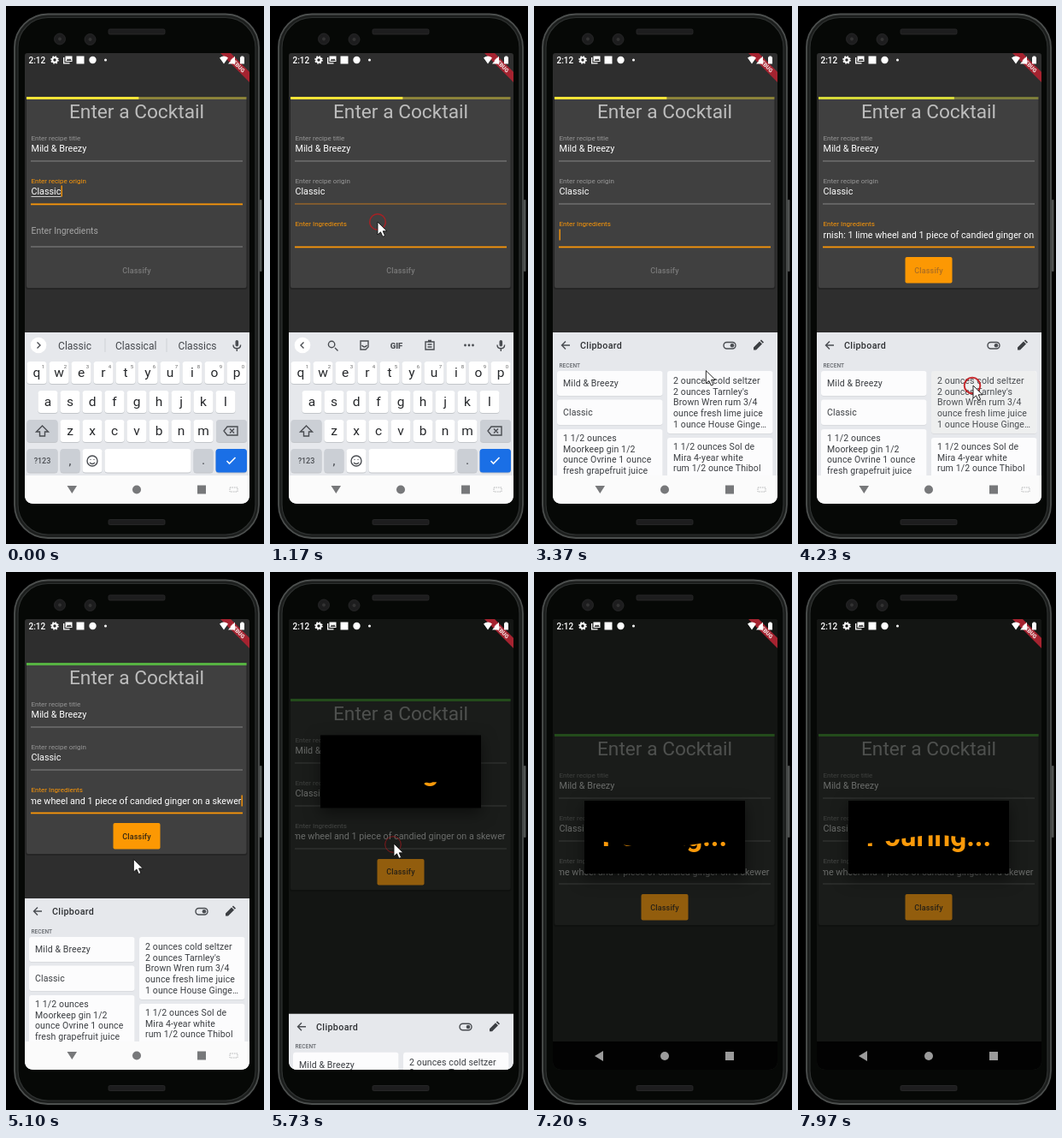
An HTML page that plays this animation: 302 by 628 pixels, repeating every 8000 ms.

```html
<!DOCTYPE html>
<html lang="en">
<head>
<meta charset="utf-8">
<title>Cocktail form</title>
<style>
html, body { margin: 0; width: 100%; height: 100%; overflow: hidden; background: #000; }
svg { display: block; width: 100%; height: 100%; }
text { font-family: Roboto, sans-serif; white-space: pre; }
.mid { text-anchor: middle; }
.line { fill: none; stroke: #4a4d52; stroke-width: 1.4; }
#dialog { filter: drop-shadow(0 6px 9px rgba(0, 0, 0, .5)); }
</style>
</head>
<body>
<svg id="stage" viewBox="0 0 302 628">
  <defs>
    <clipPath id="screen"><path d="M22 58q0-3 3-3H282q3 0 3 3V570q0 11-11 11H33q-11 0-11-11Z"/></clipPath>
    <clipPath id="fieldClip"><rect x="29" y="255" width="248.500" height="24"/></clipPath>
    <clipPath id="panelClip"><rect x="22" y="381" width="263" height="167"/></clipPath>
    <clipPath id="liquid"><path id="wave"/></clipPath>
  </defs>

  <!-- phone body -->
  <rect x="297" y="226" width="2.500" height="84" rx="1" fill="#505352"/>
  <rect x="10" y="9.500" width="286" height="611.500" rx="39" fill="#1c1e1d" stroke="#4c4f4e" stroke-width="1.800"/>
  <rect x="14" y="13.500" width="278" height="603.500" rx="35" fill="#060806" stroke="#2e3130" stroke-width="1.200"/>
  <g fill="#1d1d1e" stroke="#2b2b2c" stroke-width=".8">
    <rect x="120" y="27" width="66" height="6" rx="1.500"/>
    <rect x="120" y="599.500" width="66" height="6" rx="1.500"/>
    <circle cx="63" cy="38.500" r="6.500"/><circle cx="98.500" cy="39" r="6.500"/>
  </g>
  <g fill="#333"><circle cx="63" cy="38.500" r="2"/><circle cx="98.500" cy="39" r="2"/></g>

  <g clip-path="url(#screen)">
    <rect x="22" y="55" width="263" height="526" fill="#2e2e2e"/>
    <g id="form">
      <rect x="23" y="107" width="259.500" height="224" rx="3" fill="#252525"/>
      <rect x="24" y="107" width="257.500" height="222" rx="2" fill="#404040"/>
      <rect id="track" x="24" y="106" width="257.500" height="3"/>
      <rect id="bar" x="24" y="106" height="3"/>
      <text class="mid" x="153" y="131" font-size="22.700" fill="#bdbdbd">Enter a Cocktail</text>
      <g id="fields"></g>
    </g>
    <rect id="barrier" x="22" y="55" width="263" height="526" fill="#010401"/>
    <g id="button">
      <rect id="buttonFill" x="125.500" y="293" width="55" height="30.500" rx="2" fill="#fc9803"/>
      <text id="buttonText" class="mid" x="153" y="311.500" font-size="9" font-weight="500" letter-spacing=".15">Classify</text>
    </g>
    <g id="dialog">
      <rect x="59" y="267" width="188" height="85" fill="#000"/>
      <text class="mid" x="153" y="319.500" font-size="33.300" font-weight="700" fill="#fb9a0a" clip-path="url(#liquid)">Pouring...</text>
    </g>

    <!-- system navigation -->
    <rect x="22" y="548" width="263" height="33" fill="#020202"/>
    <g fill="#9b9b9b"><path d="M71 565l10-6v12z"/><circle cx="153" cy="565" r="5"/><rect x="224" y="560" width="10" height="10"/></g>

    <g id="keyboard">
      <rect x="22" y="381" width="263" height="200" fill="#e6e8ec"/>
      <g id="keys"></g>
      <g id="suggestions" font-size="12" fill="#44474c"></g>
      <g id="tools">
        <path class="line" d="M76 399l3.500 3.500M75.800 395a3.700 3.700 0 1 1-7.400 0a3.700 3.700 0 1 1 7.400 0M106 391h9v7l-3 3h-6zM107.500 396q3 4 6 0M182 392h10v9h-10zM185 390.500h4M184.500 395h5M184.500 398h5"/>
        <text class="mid" x="148" y="399.500" font-size="9.500" font-weight="900" fill="#4a4d52">GIF</text>
        <g fill="#4a4d52"><circle cx="228.500" cy="396" r="1.400"/><circle cx="233" cy="396" r="1.400"/><circle cx="237.500" cy="396" r="1.400"/></g>
      </g>
      <g id="strip">
        <circle cx="38" cy="396" r="9.300" fill="#fff"/>
        <path id="chevron" class="line"/>
        <rect x="268.500" y="390" width="3.600" height="7.500" rx="1.800" fill="#4a4d52"/>
        <path class="line" stroke-width="1.100" d="M266 395.500q0 4.300 4.300 4.300t4.300-4.300M270.300 400v3"/>
      </g>
      <g id="clipboard" clip-path="url(#panelClip)">
        <rect x="22" y="381" width="263" height="167" fill="#e6e8ec"/>
        <path class="line" d="M42 396H33M37 391.500l-4.500 4.500 4.500 4.500"/>
        <text x="54" y="400" font-size="10.700" font-weight="500" letter-spacing=".35" fill="#2e3033">Clipboard</text>
        <rect class="line" x="222" y="392.500" width="14" height="7.500" rx="3.700"/><circle cx="232" cy="396.200" r="2.300" fill="#4a4d52"/>
        <path d="M257 401.500v-3l7-7 3 3-7 7zM264.800 390.700l1.200-1.200 3 3-1.200 1.200z" fill="#3c3f43"/>
        <text x="29.500" y="421.500" font-size="6.600" font-weight="500" fill="#66696e">RECENT</text>
        <g id="cards" font-size="10.500" letter-spacing=".13"></g>
        <rect id="ripple" x="156" y="426" width="123" height="73" rx="3" fill="#9aa0a6"/>
      </g>
      <rect x="22" y="548" width="263" height="33" fill="#fbfbfb"/>
      <g fill="#77787a"><path d="M71.500 560h11.500l-5.700 9z"/><circle cx="153" cy="564.500" r="5"/><rect x="224" y="559.500" width="10" height="10"/></g>
      <path d="M262 562h9v5h-9z" fill="none" stroke="#b5b6b8" stroke-dasharray="1.500 1"/>
    </g>

    <!-- status bar -->
    <path d="M251 55h12l22 22v12z" fill="#a52330"/>
    <text class="mid" transform="translate(269.500 70.700) rotate(45)" font-size="6.500" font-weight="900" fill="#f3dede">DEBUG</text>
    <g fill="#fff">
      <text x="26.500" y="67" font-size="10" font-weight="500">2:12</text>
      <circle cx="57" cy="63" r="2.700" fill="none" stroke="#fff" stroke-width="2"/>
      <circle cx="57" cy="63" r="4" fill="none" stroke="#fff" stroke-width="1.600" stroke-dasharray="1.600 1.542"/>
      <path d="M67 60v7.500h7.500v-1.300H68.300V60zM69.500 58.500h8v6.500h-8z"/>
      <path d="M70.500 64l2-2.500 1.300 1.300 1.200-1.500 1.800 2.700z" fill="#333"/>
      <rect x="82.500" y="58.500" width="9" height="9"/><circle cx="101.500" cy="63" r="4.200"/><circle cx="116.500" cy="63" r="1.500"/>
      <path d="M250 60.500q5-4 10 0l-5 7zM268 58.500v9h-8zM274 59.500h1.200v-1h2.600v1H279v8h-5z"/>
    </g>
  </g>

  <circle id="dot" cx="126" cy="252.500" r="1.700" fill="#8d1c1c"/>
  <circle id="ring" fill="none" stroke="#c4181d"/>
  <path id="mouse" d="M0 0V15L3.500 11.800 6 17.300 8.600 16.200 6.200 10.800H11Z" fill="#fff" stroke="#111" stroke-width=".9"/>
</svg>
<script>
const LOOP = 8000, ORANGE = [250, 150, 8], GREY = [150, 150, 150];
const $ = id => document.getElementById(id);
const set = (node, attrs) => { for (const k in attrs) node.setAttribute(k, attrs[k]); return node; };
function add(parent, tag, attrs, text) {
  const node = set(document.createElementNS("http://www.w3.org/2000/svg", tag), attrs);
  if (text) node.textContent = text;
  return parent.appendChild(node);
}
const progress = (t, from, to) => Math.min(1, Math.max(0, (t - from) / (to - from)));
const smooth = p => p * p * (3 - 2 * p);
const ease = (t, from, to) => smooth(progress(t, from, to));
const mix = (a, b, p) => a + (b - a) * p;
const blend = (a, b, p) => `rgb(${a.map((v, i) => Math.round(mix(v, b[i], p)))})`;
const show = (id, opacity) => set($(id), { opacity: +opacity });

// Form fields
const fields = $("fields");
function addField(y, label, value) {
  return {
    label: add(fields, "text", { x: 29.5, y: y - 24, "font-size": 8, fill: blend(GREY, GREY, 0) }, label),
    value: add(fields, "text", { x: 29.5, y: y - 11, "font-size": 10.75, fill: "#fff" }, value),
    line: add(fields, "rect", { x: 29, y: y - .5, width: 248, height: 1, fill: "#858585" }),
  };
}
const DRINK = "Mild & Breezy";
const title = addField(181, "Enter recipe title", DRINK);
const origin = addField(231, "Enter recipe origin", "Classic");
const ingredients = addField(281, "Enter Ingredients", "");
const RECIPE = "2 ounces cold seltzer 2 ounces Tarnley's Brown Wren rum 3/4 ounce fresh lime juice " +
  "1 ounce House Ginger syrup. Garnish: 1 lime wheel and 1 piece of candied ginger on a skewer";
const clipped = add(fields, "g", { "clip-path": "url(#fieldClip)" });
clipped.append(ingredients.value);
ingredients.value.textContent = RECIPE;
set(ingredients.value, { "text-anchor": "end", y: 270.5 });
set(ingredients.label, { x: 0, y: 0 });
const composing = add(fields, "rect", { x: 29.5, y: 222, width: 35, height: .9, fill: "#ddd" });
const caret = add(fields, "rect", { width: 1.4, height: 13, fill: blend(ORANGE, ORANGE, 0) });

// Keyboard
const keys = $("keys");
function addKey(x, y, width, fill = "#fff", height = 26) {
  add(keys, "rect", { x, y: y + 1, width, height, rx: 3.5, fill: "#c3c6ca" });
  add(keys, "rect", { x, y, width, height, rx: 3.5, fill });
}
function addRow(letters, x, y, hints = "") {
  [...letters].forEach((letter, i) => {
    const cx = x + i * 26;
    addKey(cx - 11.5, y - 13, 23);
    add(keys, "text", { class: "mid", x: cx, y: y + 5, "font-size": 15.5, fill: "#26282b" }, letter);
    if (hints) add(keys, "text", { class: "mid", x: cx + 7.5, y: y - 5, "font-size": 6, fill: "#666" }, hints[i]);
  });
}
addRow("qwertyuiop", 36, 428, "1234567890");
addRow("asdfghjkl", 49, 462);
addRow("zxcvbnm", 75, 496);
const DARK_KEY = "#cbcfd5";
for (const [x, y, width, fill] of [
  [24.5, 483, 36, DARK_KEY], [246, 483, 36, DARK_KEY], [24.5, 517, 36, DARK_KEY], [63.5, 517, 23, DARK_KEY],
  [89.5, 517, 23], [115.5, 517, 101], [219.5, 517, 23, DARK_KEY], [245.5, 517, 36.5, "#1a6fe6"],
]) addKey(x, y, width, fill, y > 500 ? 27.5 : 26);
for (const [x, y, size, text] of [[42.5, 534, 9, "?123"], [75, 535, 13, ","], [231, 535, 13, "."]])
  add(keys, "text", { class: "mid", x, y, "font-size": size, "font-weight": 500, fill: "#4a4d52" }, text);
add(keys, "path", { class: "line", d: "M42.500 490l-7 7h4v5h6v-5h4zM259 491h12v10h-12l-4-5zM262 493.500l5 5m0-5l-5 5M107 531a6 6 0 1 1-12 0a6 6 0 1 1 12 0M98 533q3 3 6 0M99 529v.8M103 529v.8" });
add(keys, "path", { d: "M258.500 531l3 3 7-7", fill: "none", stroke: "#fff", "stroke-width": 1.6 });

["Classic", "Classical", "Classics"].forEach((word, i) =>
  add($("suggestions"), "text", { class: "mid", x: 80.5 + i * 71.7, y: 401 }, word));
add($("suggestions"), "path", { d: "M116 388v16M188 388v16", stroke: "#cfd2d6" });

// Clipboard cards
function addCard(x, y, height, baseline, lines) {
  add($("cards"), "rect", { x, y: y + .8, width: 123.5, height, rx: 3, fill: "#d5d7db" });
  add($("cards"), "rect", { x, y, width: 123.5, height, rx: 3, fill: "#fcfcfd" });
  lines.forEach((line, i) =>
    add($("cards"), "text", { x: x + 7, y: baseline + i * 12.7, fill: "#3a3d41" }, line));
}
addCard(27, 426, 29, 444, [DRINK]);
addCard(27, 459.5, 29.5, 478, ["Classic"]);
addCard(27, 494, 60, 508, ["1 1/2 ounces", "Moorkeep gin 1/2", "ounce Ovrine 1 ounce", "fresh grapefruit juice"]);
addCard(156, 426, 73, 441, ["2 ounces cold seltzer", "2 ounces Tarnley's", "Brown Wren rum 3/4", "ounce fresh lime juice", "1 ounce House Ginge…"]);
addCard(156, 504, 50, 518, ["1 1/2 ounces Sol de", "Mira 4-year white", "rum 1/2 ounce Thibol"]);

// Pointer: time, x, y
const PATH = [
  [200, -14, 330], [740, 126, 252], [1570, 126, 252], [2260, 195, 396], [2900, 195, 396], [3700, 205, 443],
  [4480, 205, 443], [5060, 150, 338], [5240, 145, 317], [5830, 145, 317], [6250, -14, 330],
];
const CLICKS = [[860, 126, 252], [2400, 194, 396], [4030, 204, 443], [5330, 144, 318]];
const PASTE = 4080, LOAD = 5400;

function movePointer(t) {
  let i = PATH.findIndex(p => p[0] > t);
  if (i < 0) i = PATH.length - 1;
  const to = PATH[i], from = PATH[Math.max(0, i - 1)];
  const p = ease(t, from[0], to[0] + .001);
  set($("mouse"), { transform: `translate(${mix(from[1], to[1], p)} ${mix(from[2], to[2], p)})` });
  const click = CLICKS.find(([start]) => t >= start && t < start + 600);
  show("ring", click ? 1 - ((t - click[0]) / 650) ** 2 : 0);
  if (click) set($("ring"), { cx: click[1], cy: click[2], r: 9.3, "stroke-width": mix(3, 1, progress(t, click[0], click[0] + 400)) });
  show("dot", t > 1460 && t < 2600);
}

function drawForm(t) {
  const pasted = t >= PASTE;
  const filled = progress(t, PASTE, 4900) ** .9;
  const color = blend([250, 228, 55], [86, 178, 66], filled);
  set($("track"), { fill: color, "fill-opacity": .42 });
  set($("bar"), { fill: color, width: 257.5 * mix(.51, 1, filled) });

  const focus = ease(t, 930, 1130), blur = ease(t, LOAD, 5560);
  set(origin.label, { fill: blend(ORANGE, GREY, focus) });
  const residue = blend([190, 118, 30], [133, 133, 133], ease(t, 2470, 2800));
  set(origin.line, { fill: focus < 1 ? blend(ORANGE, [190, 118, 30], focus) : residue, height: mix(1.8, 1, focus) });
  const active = focus * (1 - blur);
  set(ingredients.label, {
    "font-size": mix(10.4, 8, focus), fill: blend([165, 165, 165], ORANGE, active),
    transform: `translate(29.5 ${mix(265.5, 257, focus)})`,
  });
  set(ingredients.line, { fill: blend([133, 133, 133], ORANGE, active), height: mix(1, 1.8, active) });

  const scroll = 900 * (1 - progress(t, PASTE, PASTE + 240)) ** 3;
  set(ingredients.value, { x: 275.5 + scroll, opacity: +pasted });
  const composed = t < 930;
  set(composing, { opacity: +composed });
  const blink = composed || Math.floor((t - (pasted ? PASTE : 1200)) / 500) % 2 === 0;
  const caretInView = !pasted || scroll < 2 && t < LOAD;
  set(caret, {
    x: composed ? 64.5 : pasted ? 275.5 : 29.5, y: composed ? 209.5 : 260.5,
    opacity: +(blink && caretInView),
  });

  show("buttonFill", progress(t, PASTE, PASTE + 110));
  set($("buttonText"), { fill: pasted ? blend([205, 130, 40], [50, 36, 18], ease(t, PASTE + 80, PASTE + 320)) : "#7a7a7a" });
}

function drawKeyboard(t) {
  const tools = t >= 960, panel = ease(t, 2560, 2680);
  show("suggestions", !tools);
  show("tools", tools);
  set($("chevron"), { d: tools ? "M39.500 392.500l-3.500 3.500 3.500 3.500" : "M36.500 392.500l3.500 3.500-3.500 3.500" });
  show("clipboard", panel);
  show("ripple", t > 4030 ? .17 * (1 - progress(t, 4200, 4500)) : 0);
  set($("keyboard"), { transform: `translate(0 ${ease(t, 5560, 5798) * 167})`, opacity: +(t < 5800) });
}

function drawDialog(t) {
  const dim = ease(t, LOAD - 20, LOAD + 130);
  const shift = `translate(0 ${83 * ease(t, 5600, 5860)})`;
  set($("form"), { transform: shift });
  set($("button"), { transform: shift, opacity: 1 - .47 * dim });
  show("barrier", .59 * dim);
  set($("dialog"), { opacity: dim, transform: `translate(0 ${-83 * (1 - ease(t, 5690, 5930))})` });
  const level = 329 - 6.5 * Math.max(0, t - LOAD) / 1000;
  const crest = .55 - (t - 7970) / 1900;
  let d = "M59 352";
  for (let x = 0; x <= 188; x += 2)
    d += `L${59 + x} ${(level - 5 * Math.cos(2 * Math.PI * (x / 188 - crest))).toFixed(2)}`;
  set($("wave"), { d: d + "V352Z" });
}

function render(now) {
  const t = now % LOOP;
  drawForm(t);
  drawKeyboard(t);
  drawDialog(t);
  movePointer(t);
}
const start = performance.now();
function tick() {
  render(performance.now() - start);
  requestAnimationFrame(tick);
}
tick();
</script>
</body>
</html>
```
